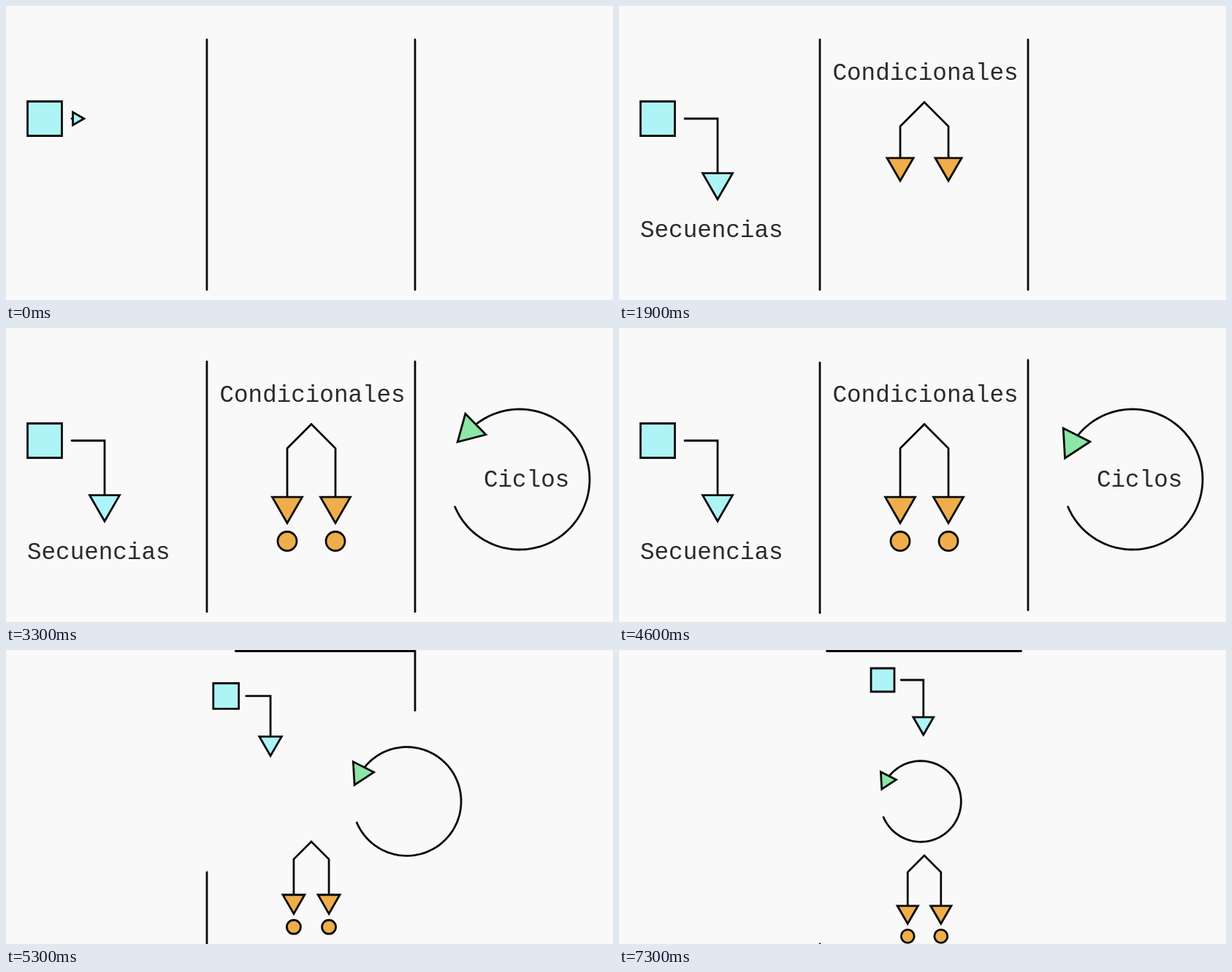
Recreate the animation shown at these times as an HTML page with a canvas. Size 831 by 402 pixels, loop 7.4 s.

```html
<!DOCTYPE html>
<html lang="es">
<head>
<meta charset="utf-8">
<style>
  html, body { margin: 0; width: 100%; height: 100%; overflow: hidden; background: #f9f9f9; }
  canvas { display: block; }
</style>
</head>
<body>
<canvas id="stage" width="831" height="402"></canvas>
<script>
const ctx = document.getElementById('stage').getContext('2d');
const LOOP = 7400, INK = '#0a0a0a', STROKE = 2.8;
const CYAN = '#aef4f6', ORANGE = '#efae4b', GREEN = '#8ce6a6';

const clamp = u => Math.max(0, Math.min(1, u));
const ramp = (t, a, b) => clamp((t - a) / (b - a));
const smooth = u => u * u * (3 - 2 * u);
const easeOut = u => 1 - (1 - u) ** 3;
const mix = (a, b, u) => a + (b - a) * u;

// Ease in and out from start to end; a smaller lag puts the rush earlier.
function glide(t, start, end, lag) {
  const u = ramp(t, start, end);
  return u * u / (u * u + lag * (1 - u) ** 2);
}

// Part of a polyline between two distances, with the direction at its end.
function slice(points, from, to) {
  const out = [];
  let walked = 0, angle = 0;
  for (let i = 1; i < points.length; i++) {
    const [x0, y0] = points[i - 1], [x1, y1] = points[i];
    const len = Math.hypot(x1 - x0, y1 - y0);
    const a = Math.max(from, walked), b = Math.min(to, walked + len);
    if (b > a) {
      const at = d => [mix(x0, x1, (d - walked) / len), mix(y0, y1, (d - walked) / len)];
      if (!out.length) out.push(at(a));
      out.push(at(b));
      angle = Math.atan2(y1 - y0, x1 - x0);
    }
    walked += len;
  }
  return { points: out, angle };
}

const lengthOf = points => points.slice(1).reduce(
  (sum, [x, y], i) => sum + Math.hypot(x - points[i][0], y - points[i][1]), 0);

function polyline(points, fill) {
  ctx.beginPath();
  points.forEach(([x, y]) => ctx.lineTo(x, y));
  if (fill) {
    ctx.closePath();
    ctx.fillStyle = fill;
    ctx.fill();
  }
  ctx.stroke();
}

// The head is centred on the end of the drawn path and grows with it.
function arrow(path, progress, fill, turn = 0) {
  if (progress <= 0) return;
  const part = slice(path, 0, lengthOf(path) * progress);
  polyline(part.points);
  const size = mix(0.4, 1, progress), angle = part.angle + turn;
  const [cx, cy] = part.points[part.points.length - 1];
  const place = (x, y) => [
    cx + size * (x * Math.cos(angle) - y * Math.sin(angle)),
    cy + size * (x * Math.sin(angle) + y * Math.cos(angle))];
  polyline([place(23.7, 0), place(-11.8, 20.5), place(-11.8, -20.5)], fill);
}

function dot(x, y, r) {
  if (r <= 0) return;
  ctx.beginPath();
  ctx.arc(x, y, r, 0, 2 * Math.PI);
  ctx.fillStyle = ORANGE;
  ctx.fill();
  ctx.stroke();
}

function label(text, x, y, alpha) {
  ctx.globalAlpha = alpha;
  ctx.fillStyle = '#2a2a2a';
  ctx.fillText(text, x, y);
  ctx.globalAlpha = 1;
}

// Draws relative to an anchor, keeping the line weight when scaled.
function group(x, y, scale, draw) {
  ctx.save();
  ctx.translate(x, y);
  ctx.scale(scale, scale);
  ctx.lineWidth = STROKE / scale;
  draw();
  ctx.restore();
}

const STEP = [[37, 0], [82, 0], [82, 86.5]];
const BRANCH = [[0, 0], [-33, 33], [-33, 111.5]];
const RAIL = [[560, 388], [560, 1.5], [284, 1.5]];
const RING = Array.from({ length: 121 }, (_, i) => {
  const a = mix(157, -148.5, i / 120) * Math.PI / 180;
  return [96 * Math.cos(a), 96 * Math.sin(a)];
});

// The left line falls away while the right one slides around the corner.
function dividers(t) {
  const drop = 356 * glide(t, 4550, 6370, 0.187);
  polyline([[275, 46 + drop], [275, 388 + drop]]);
  const tail = 396 * glide(t, 4550, 6370, 0.146);
  const head = 342 + 320 * glide(t, 4550, 5750, 0.286);
  polyline(slice(RAIL, tail, head).points);
}

function labels(t) {
  const fall = ramp(t, 4600, 5100) ** 2;
  const drop = 100 * fall, fade = 1 - fall;

  label('Secuencias', 29, 315.5 + drop, fade * ramp(t, 0, 500));

  if (t >= 1400) {
    const grow = mix(0.81, 1, easeOut(ramp(t, 1400, 1900)));
    group(292.5, 33 + drop, grow, () => label('Condicionales', 0, 67.5, fade));
  }

  if (t >= 2600) {
    ctx.save();
    ctx.translate(591, 226);
    ctx.rotate(0.14 * (1 - easeOut(ramp(t, 2600, 3100))));
    label('Ciclos', 63, -9.5, 1 - ramp(t, 5000, 5300));
    ctx.restore();
  }
}

function sequence(t) {
  const p = glide(t, 4600, 5830, 0.42);
  group(mix(53, 361, p), mix(154, 41, p), mix(1, 0.68, p), () => {
    polyline([[-23.5, -23.5], [23.5, -23.5], [23.5, 23.5], [-23.5, 23.5]], CYAN);
    arrow(STEP, smooth(ramp(t, -110, 700)), CYAN);
  });
}

function loopArrow(t) {
  const p = glide(t, 4750, 5950, 0.63);
  const turn = -2.2 * smooth(ramp(t, 3300, 3500));
  group(mix(703, 413, p), 207, mix(1, 0.576, p), () =>
    arrow(RING, smooth(ramp(t, 2600, 3400)), GREEN, turn));
}

function condition(t) {
  const p = glide(t, 4600, 5800, 0.285);
  const grown = smooth(ramp(t, 1400, 2100));
  const radius = 13 * ramp(t, 2100, 2300);
  group(418, mix(131.5, 281, p), mix(1, 0.69, p), () => {
    for (const side of [1, -1]) {
      arrow(BRANCH.map(([x, y]) => [x * side, y]), grown, ORANGE);
      dot(33 * side, 160, radius);
    }
  });
}

function draw(t) {
  ctx.fillStyle = '#f9f9f9';
  ctx.fillRect(0, 0, 831, 402);
  ctx.strokeStyle = INK;
  ctx.lineWidth = STROKE;
  ctx.lineCap = 'round';
  ctx.lineJoin = 'miter';
  ctx.font = '32.6px "Courier New", "Liberation Mono", monospace';
  dividers(t);
  labels(t);
  sequence(t);
  loopArrow(t);
  condition(t);
}

const start = performance.now();
function frame() {
  // The picture advances ten times a second.
  const t = (performance.now() - start) % LOOP;
  draw(Math.floor(t / 100) * 100);
  requestAnimationFrame(frame);
}
frame();
</script>
</body>
</html>
```
